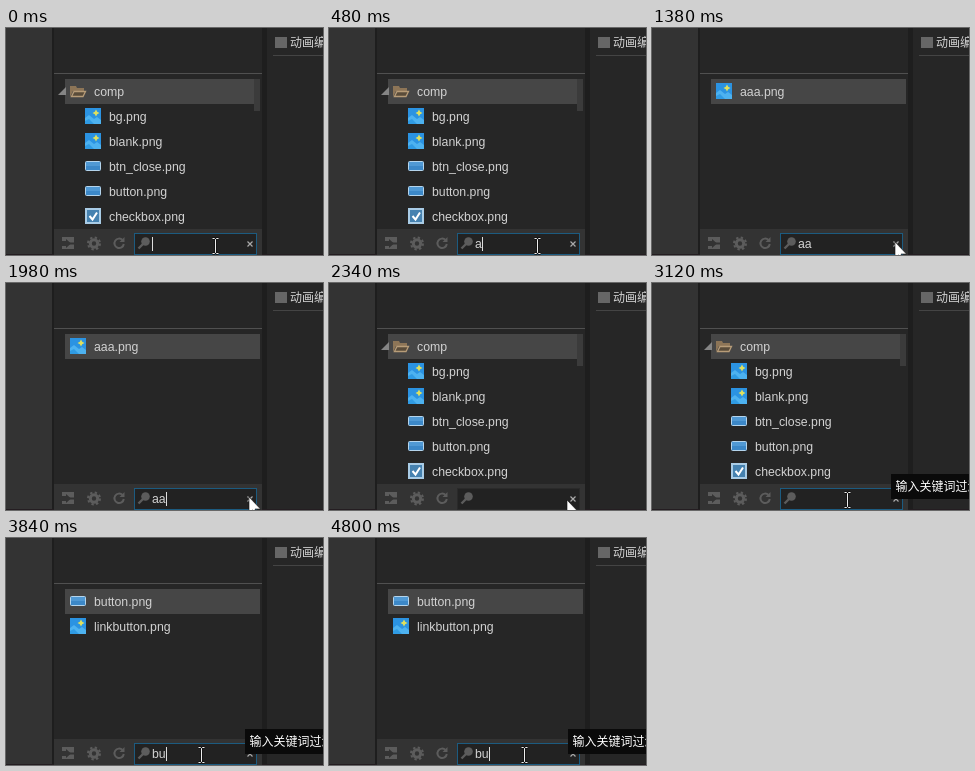
These frames come from a looping animation (317x227 px, 4980 ms). An HTML page:

```html
<!DOCTYPE html>
<html lang="zh">
<head>
<meta charset="utf-8">
<title>Filter box</title>
<style>
  html, body { margin: 0; width: 100%; height: 100%; overflow: hidden; background: #262626; }
  svg { display: block; width: 100%; height: 100%; }
  text { font: 12.3px "Liberation Sans", Arial, sans-serif; fill: #d2d2d2; white-space: pre; }
  .zh { font: 12px "Noto Sans CJK SC", "Noto Sans CJK", sans-serif; }
  .tip { fill: #fff; }
</style>
</head>
<body>
<svg viewBox="0 0 317 227">
  <defs>
    <!-- 16 x 16 file icons -->
    <g id="image">
      <path fill="#2b93e2" d="M0 0h16v16H0z"/>
      <path fill="#4db2f0" d="M0 10l4-3 5 4 3-2 4 3v4H0z"/>
      <path fill="#2f9be4" d="M0 13l4-2 5 5H0z"/>
      <path fill="#dfe05e" d="M11 1.500l1.200 2.300L14.500 5l-2.300 1.200L11 8.500 9.800 6.200 7.500 5l2.300-1.200z"/>
    </g>
    <g id="button">
      <rect x=".5" y="3.500" width="15" height="9" rx="1" fill="#3c88c8" stroke="#b4d4ec"/>
      <path fill="#5099d4" d="M1 4h14v4H1z"/>
    </g>
    <g id="checkbox">
      <rect x="1" y="1" width="14" height="14" fill="#4682b0" stroke="#a9cce6" stroke-width="2"/>
      <path d="M4.500 8l3 3.500 4.500-7" fill="none" stroke="#fff" stroke-width="2"/>
    </g>
    <g id="clip">
      <path stroke="#e4e4e4" stroke-width="3" stroke-dasharray="3.300 .9" d="M0 3.500h16M0 7.500h16"/>
      <path stroke="#5ca5d8" stroke-width="3" stroke-dasharray="3.300 .9" d="M0 11.500h16"/>
    </g>
    <g id="label">
      <path d="M3 13.500L7 3h2l4 10.500M5 10h6" fill="none" stroke="#8eae50" stroke-width="2.200"/>
    </g>
    <g id="radio">
      <circle cx="8" cy="8" r="4.500" fill="#e9dfc4"/>
      <circle cx="8" cy="8" r="1.700" fill="#4a4538"/>
    </g>
    <g id="group" stroke="#dedede" stroke-width="2">
      <path d="M1 3h3M1 8h3M1 13h3" stroke-width="3"/>
      <path d="M6 3h9M6 8h9M6 13h9"/>
    </g>
    <g id="combo">
      <rect x=".5" y="3.500" width="15" height="9" fill="#3d8ccc" stroke="#c5dff2"/>
      <path d="M9 6h5l-2.500 4z" fill="#fff"/>
    </g>
    <!-- pointers, with the hot spot at 0,0 -->
    <g id="beam" fill="none">
      <path id="stem" d="M-2.500-7.500h2l1 1 1-1h2M.5-6.500v13M-2.500 7.500h2l1-1 1 1h2" stroke="#111" stroke-width="2"/>
      <use href="#stem" style="stroke:#eee"/>
      <path d="M-2.500-7.500h2l1 1 1-1h2M.5-6.500v13M-2.500 7.500h2l1-1 1 1h2" stroke="#eee"/>
    </g>
    <path id="arrow" d="M0-1v16.500l3.700-3.600 2.500 5.600 2.300-1-2.500-5.500h5.500z" fill="#fff" stroke="#111" stroke-width=".6"/>
  </defs>

  <path fill="#262626" d="M0 0h317v227H0z"/>
  <path fill="#333" d="M0 0h46v227H0zM48 201h208v26H48z"/>
  <path fill="#1e1e1e" d="M46 0h2v227h-2zM256 0h5v227h-5z"/>
  <path fill="#505050" d="M48 45h208v1H48z"/>
  <path fill="#444" d="M267 27h50v1h-50z"/>
  <path fill="#241d21" d="M0 226h48v1H0zM256 226h61v1h-61z"/>
  <path fill="#666" d="M269 9h12v11h-12z"/>
  <text class="zh" x="284" y="19">动画编辑</text>

  <g fill="none" stroke="#5c5c5c" stroke-width="2">
    <path d="M56 209h12v12H56v-3h4v2l5-4.500-5-4.500v2h-4z" fill="#5c5c5c" stroke="none"/>
    <path d="M60 215.500h8" stroke="#333"/>
    <circle cx="88" cy="215.500" r="3.700" stroke-width="3"/>
    <circle cx="88" cy="215.500" r="6" stroke-dasharray="2.350 2.360"/>
    <path d="M116.500 212a4.700 4.700 0 1 0 1.300 4"/>
    <path d="M118.500 209v5h-5z" fill="#5c5c5c" stroke="none"/>
  </g>
  <g id="scene"></g>
</svg>

<script>
const LOOP = 4980, TICK = 60;
const scene = document.getElementById("scene");

const files = [
  ["bg", "image"], ["blank", "image"], ["btn_close", "button"], ["button", "button"],
  ["checkbox", "checkbox"], ["clip_tree_arrow", "clip"], ["combobox", "combo"],
  ["image", "image"], ["label", "label"], ["linkbutton", "image"],
  ["radio", "radio"], ["radiogroup", "group"]
];

// Each list holds [start time, value]; the latest started value applies.
const typed = [[0, ""], [480, "a"], [900, "aa"], [2040, ""], [3600, "b"], [3780, "bu"]];
const filters = [[0, ""], [540, "a"], [960, "aa"], [2100, ""], [3660, "b"], [3840, "bu"]];
const caret = [[0, 1], [240, 0], [480, 1], [1380, 0], [1860, 1], [2160, 0],
               [2640, 1], [3120, 0], [3600, 1], [4320, 0], [4800, 1]];
const focus = [[0, 1], [2340, 0], [2640, 1]];
const at = (list, t) => list.findLast(([start]) => start <= t)[1];

// Pointer path: time, x, y
const path = [[0, 209, 218], [60, 209, 218], [120, 208, 218], [1020, 208, 218], [1200, 243, 215],
              [2280, 243, 215], [2340, 238, 218], [2700, 195, 217], [LOOP, 195, 217]];

function pointer(t) {
  const i = path.findIndex(p => p[0] > t);
  const [t0, x0, y0] = path[i - 1], [t1, x1, y1] = path[i];
  const k = (t - t0) / (t1 - t0);
  const x = Math.round(x0 + (x1 - x0) * k), y = Math.round(y0 + (y1 - y0) * k);
  return `<use href="#${x > 234 ? "arrow" : "beam"}" x="${x}" y="${y}"/>`;
}

const rect = (x, y, w, h, fill, extra = "") =>
  `<rect x="${x}" y="${y}" width="${w}" height="${h}" fill="${fill}" ${extra}/>`;
const text = (x, y, s, cls = "") => `<text x="${x}" y="${y}" class="${cls}">${s}</text>`;

const row = ([name, icon], i, x) =>
  `<use href="#${icon}" x="${x}" y="${55 + i * 25}"/>` + text(x + 24, 68 + i * 25, name + ".png");

function fileList(filter) {
  const highlight = rect(59, 51, 195, 25, "#464646");
  if (!filter) {
    return highlight + rect(248, 51, 6, 32, "#3b3b3b") +
      `<path d="M60 59v8h-8z" fill="#858585"/>
       <path d="M64 69V58h6l1 2h7v3H67z" fill="#8d7557"/>
       <path d="M65.500 68.500l2.500-5h11.500l-2.500 5z" fill="#5a4c3a" stroke="#b79c78" stroke-width="1.300"/>` +
      text(88, 68, "comp") + files.slice(0, 5).map((f, i) => row(f, i + 1, 79)).join("");
  }
  const found = filter === "aa" ? [["aaa", "image"]] : files.filter(f => f[0].includes(filter));
  return highlight + found.slice(0, 6).map((f, i) => row(f, i, 64)).join("");
}

function searchBox(t) {
  const value = at(typed, t), focused = at(focus, t);
  return rect(128.5, 205.5, 122, 21, "#222", `stroke="${focused ? "#1c5b80" : "#2a2a2a"}"`) +
    `<path d="M137 216l-4.500 4.500" stroke="#5c5c5c" stroke-width="2.400"/>
     <circle cx="139.500" cy="213.500" r="4.300" fill="#5c5c5c"/>
     <path d="M241.500 213.500l5 5m0-5l-5 5" stroke="#aaa" stroke-width="1.200"/>` +
    text(146, 220, value) +
    (at(caret, t) ? rect(146 + 7 * value.length, 209, 1, 14, "#ddd") : "");
}

const tooltip = t => t < 2400 ? "" :
  rect(239, 191, 78, 25, "#0a0a0a") + text(243.5, 208, "输入关键词过滤", "zh tip");

let shown = -1;
function frame(now) {
  const t = Math.floor(now % LOOP / TICK) * TICK;
  if (t !== shown) {
    shown = t;
    scene.innerHTML = fileList(at(filters, t)) + searchBox(t) + tooltip(t) + pointer(t);
  }
  requestAnimationFrame(frame);
}
frame(performance.now());
</script>
</body>
</html>
```
